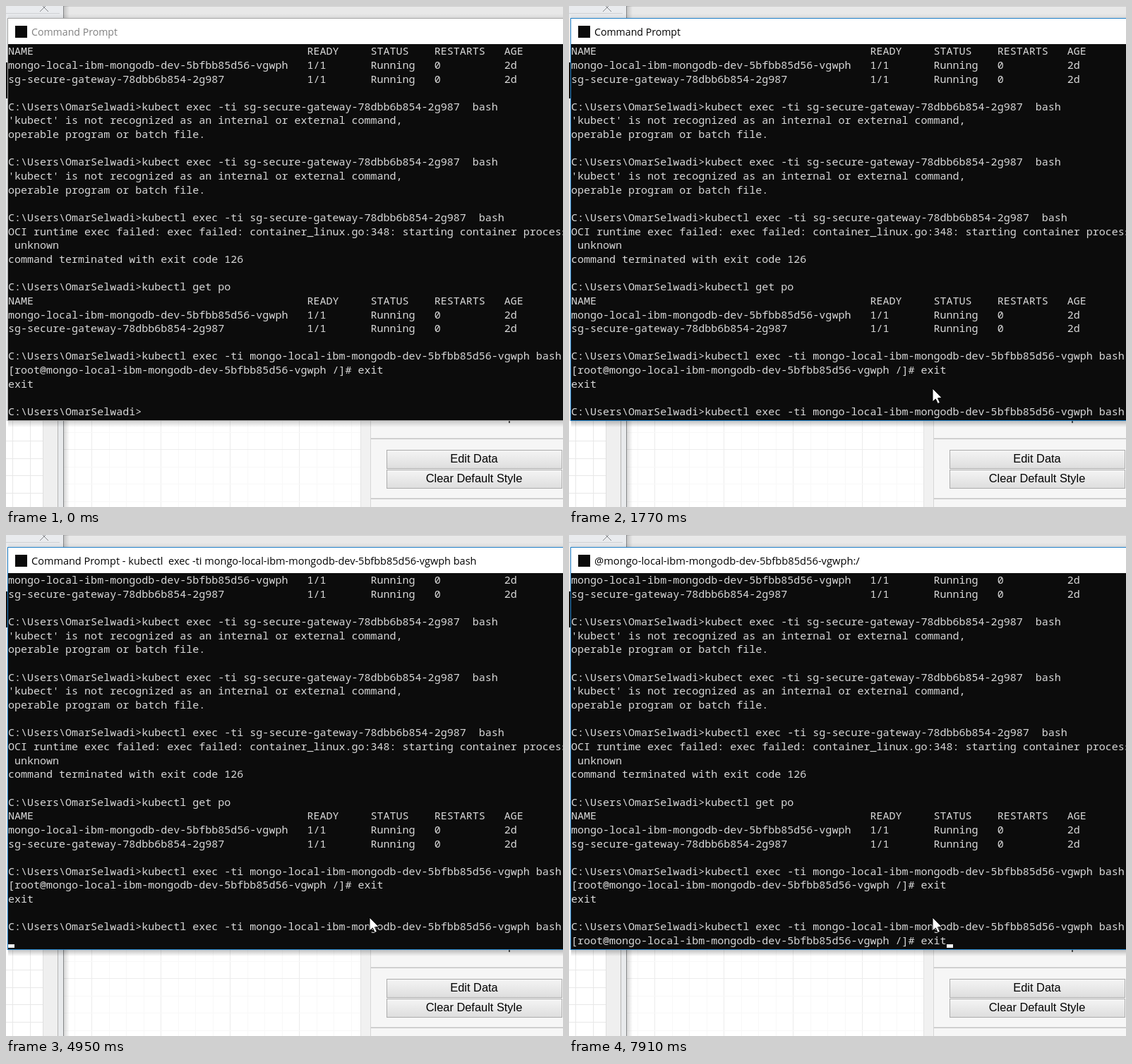
An HTML page with a canvas that plays this animation: 789x710 px, repeating every 8 s.

```html
<!DOCTYPE html>
<html lang="en">
<head>
<meta charset="utf-8">
<title>Terminal session</title>
<style>
html, body { margin: 0; width: 100%; height: 100%; overflow: hidden; background: #fff; }
canvas { display: block; width: 789px; height: 710px; }
</style>
</head>
<body>
<canvas id="stage" width="789" height="710"></canvas>
<script>
const ctx = document.getElementById('stage').getContext('2d');
const W = 789, H = 710, LOOP = 8000;
const CELL = 9.018, ROW = 19.65, LEFT = 3, BASE = 69.2;
const MONO = '500 15.03px "Noto Sans Mono", "DejaVu Sans Mono", monospace';

const pod = 'mongo-local-ibm-mongodb-dev-5bfbb85d56-vgwph';
const gateway = 'sg-secure-gateway-78dbb6b854-2g987';
const prompt = 'C:\\Users\\OmarSelwadi>';
const shell = `[root@${pod} /]# `;
const execPod = `kubectl exec -ti ${pod} bash`;

const row = (name, ready, status, restarts, age) =>
  name.padEnd(47) + ready.padEnd(10) + status.padEnd(10) + restarts.padEnd(11) + age;
const table = [
  row('NAME', 'READY', 'STATUS', 'RESTARTS', 'AGE'),
  row(pod, '1/1', 'Running', '0', '2d'),
  row(gateway, '1/1', 'Running', '0', '2d'),
  ''
];
const typo = [
  `${prompt}kubect exec -ti ${gateway}  bash`,
  "'kubect' is not recognized as an internal or external command,",
  'operable program or batch file.',
  ''
];
const history = [
  ...table, ...typo, ...typo,
  `${prompt}kubectl exec -ti ${gateway}  bash`,
  'OCI runtime exec failed: exec failed: container_linux.go:348: starting container process',
  ' unknown',
  'command terminated with exit code 126',
  '',
  `${prompt}kubectl get po`,
  ...table,
  prompt + execPod,
  shell + 'exit',
  'exit',
  ''
];

// Times at which the text cursor turns on and off
const cursorOn = [[683, 760], [1300, 1770], [2000, 2310], [2840, 3390], [3940, 4400],
  [4950, 5500], [6050, 6200], [7060, 7590], [7910, 8000]];

function rect(x, y, w, h, color) {
  ctx.fillStyle = color;
  ctx.fillRect(x, y, w, h);
}

function fade(x, y, w, h, from, to, across) {
  const g = across ? ctx.createLinearGradient(x, 0, x + w, 0)
                   : ctx.createLinearGradient(0, y, 0, y + h);
  g.addColorStop(0, from);
  g.addColorStop(1, to);
  rect(x, y, w, h, g);
}

function text(str, x, y, font, color, align = 'left') {
  ctx.font = font;
  ctx.fillStyle = color;
  ctx.textAlign = align;
  ctx.fillText(str, x, y);
}

function button(y, h, label) {
  rect(539, y, 249, h, '#acacac');
  fade(540, y + 1, 247, h - 2, '#f4f4f4', '#dedede');
  text(label, 663, y + 18, '16.4px "Liberation Sans", Arial, sans-serif', '#000', 'center');
}

function drawBackdrop() {
  rect(0, 0, W, H, '#fff');

  // strip above the terminal
  rect(0, 0, 81, 18, '#e9ebee');
  rect(0, 10, 76, 1, '#cfd1d4');
  rect(82, 0, W - 82, 18, '#e8e8e8');
  rect(82, 0, W - 82, 1, '#cfcfcf');
  ctx.strokeStyle = '#85878a';
  ctx.lineWidth = 1;
  ctx.beginPath();
  ctx.moveTo(48, 8); ctx.lineTo(56, 0);
  ctx.moveTo(60, 8); ctx.lineTo(52, 0);
  ctx.stroke();
  rect(0, 18, 3, 570, '#e4e6e8');
  rect(0, 80, 2, 51, '#111');

  // left sheet
  for (let x = 9; x < 52; x += 24.5) rect(Math.round(x), 587, 1, 123, '#e8e8e8');
  for (let y = 616; y < H; y += 24.5) rect(0, Math.round(y), 52, 1, '#e8e8e8');
  rect(52, 587, 21, 123, '#efefef');
  rect(52, 587, 1, 123, '#dfdfdf');
  rect(73, 587, 1, 123, '#b5b5b5');
  rect(74, 587, 7, 123, '#e8eaec');

  // middle sheet
  for (let i = -1; i < 16; i++) {
    rect(Math.round(121 + i * 24.5), 587, 1, 123, i % 4 ? '#f8f8f8' : '#ececec');
  }
  for (let i = -1; i < 4; i++) {
    rect(82, Math.round(628 + i * 24.5), 420, 1, i % 4 ? '#f8f8f8' : '#ececec');
  }
  for (const [y, h] of [[0, 18], [587, 123]]) {
    rect(81, y, 1, h, '#858789');
    fade(82, y, 8, h, 'rgba(0,0,0,.16)', 'rgba(0,0,0,0)', true);
  }

  // side panel
  rect(502, 587, 15, 123, '#f1f1f1');
  rect(502, 587, 1, 123, '#e4e4e4');
  rect(516, 587, 1, 123, '#d6d6d6');
  rect(517, 587, W - 517, 123, '#f6f6f6');
  rect(517, 612.5, W - 517, 1.5, '#c4c4c4');
  rect(517, 697.5, W - 517, 1.5, '#c4c4c4');
  rect(712, 587, 2, 4, '#555');
  button(629, 27, 'Edit Data');
  button(657, 27, 'Clear Default Style');
}

function titleAt(t) {
  if (t < 2000) return ['Command Prompt', 14.15];
  if (t < 6200) return [`Command Prompt - kubectl  exec -ti ${pod} bash`, 14.5];
  return [`@${pod}:/`, 14.7];
}

function linesAt(t) {
  if (t < 1300) return [...history, prompt];
  const lines = [...history, prompt + execPod];
  if (t < 2000) return lines;
  const last = t < 6200 ? '' : t < 7910 ? shell : shell + 'exit';
  return [...lines.slice(1), last];
}

function drawTerminal(t) {
  const active = t >= 683;
  fade(3, 588, W - 3, 9, active ? 'rgba(0,0,0,.24)' : 'rgba(0,0,0,.18)', 'rgba(0,0,0,0)');
  fade(3, 11, W - 3, 7, 'rgba(0,0,0,0)', 'rgba(0,0,0,.08)');
  rect(2, 17, W - 2, 571, active ? '#1f80c8' : '#a5a5a5');
  rect(3, 18, W - 3, 36, '#fff');
  rect(3, 54, W - 3, 533, '#0c0c0c');
  rect(13, 28, 17, 17, '#0a0a0a');

  const [title, size] = titleAt(t);
  text(title, 36, 42, `${size}px "Open Sans", "Noto Sans", sans-serif`, active ? '#000' : '#808080');

  const lines = linesAt(t);
  lines.forEach((line, i) => text(line, LEFT, Math.round(BASE + i * ROW), MONO, '#d8d8d8'));

  if (cursorOn.some(([from, to]) => t >= from && t < to)) {
    const col = lines[lines.length - 1].length;
    rect(Math.round(LEFT + col * CELL), 580, 9, 5, '#f2f2f2');
  }
}

function drawPointer(t) {
  if (t < 300) return;
  const step = Math.min(4, Math.floor((t - 300) / 77));
  const left = (1 - step / 4) ** 2;
  const x = 515 + 260 * left, y = 542 + 119 * left;
  const shape = [[0, 0], [0, 19], [4.3, 15], [7.4, 21.5], [10.5, 20.2], [7.5, 13.8], [13.3, 13.5]];
  ctx.beginPath();
  for (const [dx, dy] of shape) ctx.lineTo(x + dx, y + dy);
  ctx.closePath();
  ctx.fillStyle = '#fff';
  ctx.fill();
  ctx.strokeStyle = '#000';
  ctx.lineWidth = 1;
  ctx.stroke();
}

const start = performance.now();
function frame() {
  const t = (performance.now() - start) % LOOP;
  drawBackdrop();
  drawTerminal(t);
  drawPointer(t);
  requestAnimationFrame(frame);
}
frame();
</script>
</body>
</html>
```
